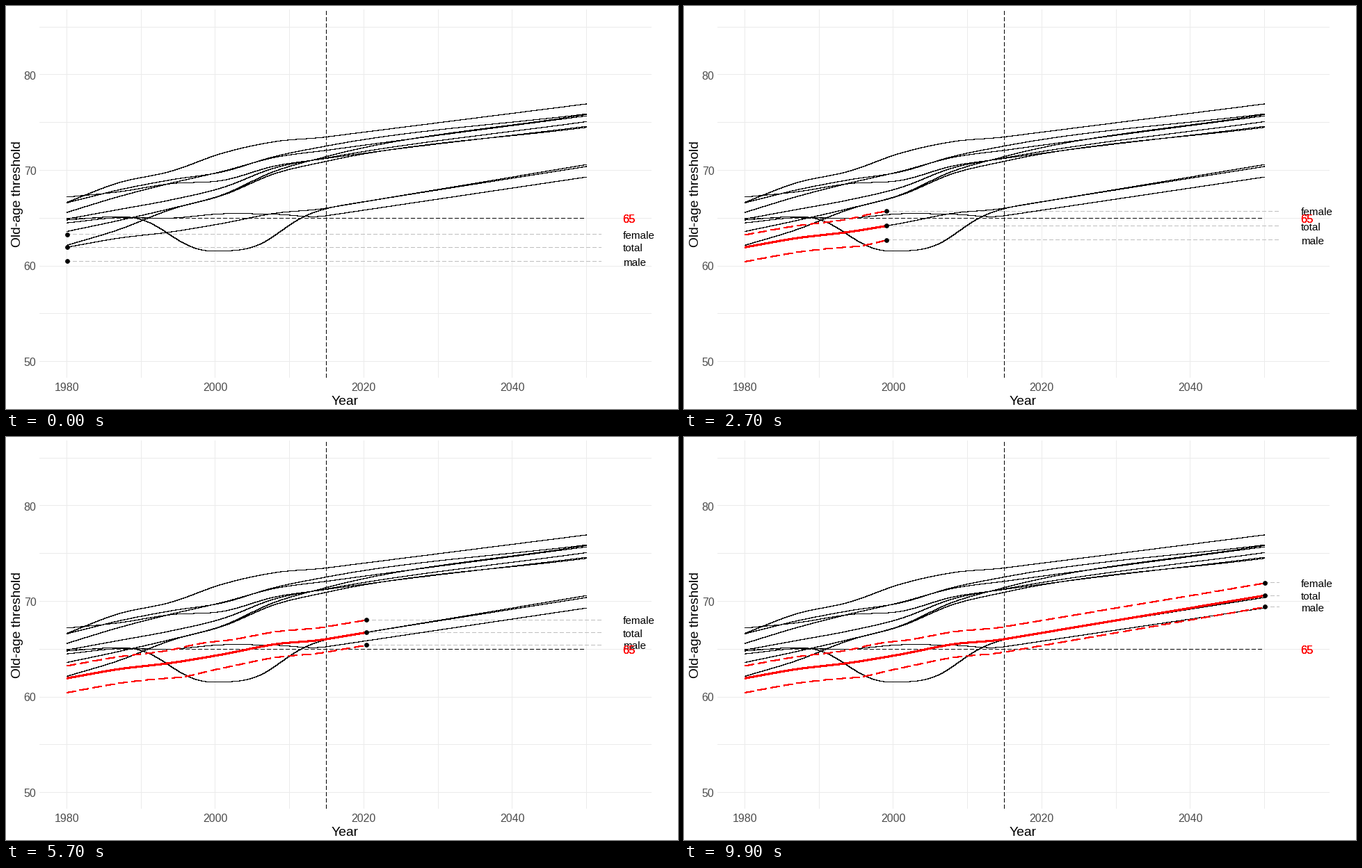
A matplotlib script that plays this animation: 966x580 px, repeating every 10 s.

```python
import numpy as np
import matplotlib.pyplot as plt
from matplotlib.animation import FuncAnimation

W, H, DPI = 966, 580, 100
FRAMES, INTERVAL = 100, 100
PX = 72 / DPI
LEFT, RIGHT, TOP, BOTTOM = 48, 927, 5, 534
X0, X1 = 87, 834
DASH, LONG_DASH = (5, 3), (13, 6)

plt.rcParams["font.family"] = "Liberation Sans"
plt.rcParams["path.simplify"] = False
fig = plt.figure(figsize=(W / DPI, H / DPI), dpi=DPI, facecolor="white")
ax = fig.add_axes([0, 0, 1, 1])
ax.set_xlim(-0.5, W - 0.5)
ax.set_ylim(H - 0.5, -0.5)
ax.axis("off")


def year_x(year):
    return X0 + (year - 1980) * (X1 - X0) / 70


def x_year(x):
    return 1980 + (x - X0) * 70 / (X1 - X0)


def age_y(age):
    return 98.5 + (80 - age) * 13.75


# Threshold curves: a key age every seven years, then one for 2050
KEYS = np.append(np.arange(1980, 2016, 7), 2050)


def curve(*ages):
    """Cubic Hermite curve that never flattens after 2015."""
    ages = np.array(ages)
    slope = np.gradient(ages, KEYS)
    slope[-2] = max(slope[-2:])

    def at(year):
        i = np.clip(np.searchsorted(KEYS, year, side="right") - 1,
                    0, len(KEYS) - 2)
        h = KEYS[i + 1] - KEYS[i]
        t = (year - KEYS[i]) / h
        u = 1 - t
        return (u * u * ((1 + 2 * t) * ages[i] + t * h * slope[i])
                + t * t * ((1 + 2 * u) * ages[i + 1] - u * h * slope[i + 1]))
    return at


def bump(year, centre, width, power=2):
    return np.exp(-np.abs((year - centre) / width) ** power)


total = curve(61.95, 62.9, 63.55, 64.45, 65.5, 66.05, 70.6)
recovery = curve(64.8, 65.2, 65.35, 65.55, 65.85, 66.1, 70.4)


def female(year):
    return total(year) + 1.33 + 0.25 * bump(year, 1998, 3.5)


def male(year):
    return (total(year) - 1.475 + 0.0043 * (year - 1980)
            - 0.2 * bump(year, 1996, 3))


def dipping(year):
    return recovery(year) - 4 * bump(year, 2001.5, 8.8, 3)


countries = [
    curve(66.65, 68.7, 69.9, 71.8, 73.0, 73.5, 76.95),
    curve(66.6, 67.95, 69.0, 69.85, 71.45, 72.55, 75.9),
    curve(67.2, 67.75, 68.6, 68.95, 70.45, 71.25, 74.6),
    curve(65.6, 67.25, 68.65, 69.9, 71.35, 72.1, 75.7),
    curve(64.9, 65.9, 66.9, 68.2, 70.25, 71.3, 75.1),
    curve(62.15, 63.8, 65.9, 67.45, 69.9, 71.45, 75.85),
    curve(63.6, 64.75, 66.0, 67.4, 69.65, 70.95, 74.5),
    curve(64.5, 65.05, 65.0, 65.45, 65.4, 65.25, 69.3),
    total,
    dipping,
]


class PixelLine:
    """Hard-edged line that fills whole pixels, like a plain GDI pen."""

    def __init__(self, color="black", width=1, dash=None, z=3):
        # Every touched pixel is filled, so the stroke is one pixel narrower.
        lw = max(width - 1, 0.5)
        style = "-" if dash is None else (0, [(d + 0.2) / lw for d in dash])
        self.shift = 0 if width % 2 else 0.5
        self.art, = ax.plot([], [], color=color, lw=lw * PX, ls=style,
                            zorder=z, antialiased=False, snap=False,
                            solid_capstyle="butt", dash_capstyle="butt")

    def set(self, x, y):
        self.art.set_data(np.round(x), np.round(y) + self.shift)


def line(x, y, *args, **kw):
    PixelLine(*args, **kw).set(x, y)


def label(x, y, text, size, color="black", ha="left", z=8, **kw):
    return ax.text(x, y, text, fontsize=size * PX, color=color, ha=ha,
                   va="baseline", zorder=z, **kw)


# Grid, ticks and titles
for year in range(1980, 2051, 10):
    line([year_x(year)] * 2, [TOP, BOTTOM], "#EBEBEB", z=1)
for age in range(50, 86, 5):
    line([LEFT, RIGHT], [age_y(age)] * 2, "#EBEBEB", z=1)
for year in range(1980, 2041, 20):
    label(year_x(year), 553, str(year), 16, "#4D4D4D", "center")
for age in range(50, 81, 10):
    label(43, age_y(age) + 6.5, str(age), 16, "#4D4D4D", "right")
label(487, 573, "Year", 19.3, ha="center")
label(21, 270, "Old-age threshold", 19.3, ha="center", rotation=90,
      rotation_mode="anchor")

xs = np.arange(X0, X1 + 1)
for country in countries:
    line(xs, age_y(country(x_year(xs))))

line([X0, X1], [age_y(65)] * 2, dash=DASH, z=4)
line([year_x(2015)] * 2, [BOTTOM, TOP], dash=DASH, z=4)
for _ in range(3):
    label(886, 311.5, "65", 16.5, "red", z=9)


class Series:
    def __init__(self, name, ages, width, dash=None):
        self.ages = ages
        self.trail = PixelLine("red", width, dash, z=5)
        self.guide = PixelLine("#BEBEBE", 1, DASH, z=2)
        self.dot, = ax.plot([], [], "o", color="black", ms=6.8 * PX, mew=0,
                            zorder=6)
        self.text = label(886.5, 0, name, 15.2)

    def move(self, x):
        path = np.append(np.arange(X0, x), x)
        heights = age_y(self.ages(x_year(path)))
        y = heights[-1]
        self.trail.set(path, heights)
        self.guide.set([x, year_x(2052)], [y, y])
        self.dot.set_data([x], [y])
        self.text.set_y(y + 6.2)


series = [Series("female", female, 2, LONG_DASH),
          Series("total", total, 3),
          Series("male", male, 2, LONG_DASH)]


def update(i):
    for s in series:
        s.move(X0 + (X1 - X0) * i / (FRAMES - 1))
    return []


anim = FuncAnimation(fig, update, frames=FRAMES, interval=INTERVAL,
                     repeat=True, repeat_delay=0, blit=False)
plt.show()
```
